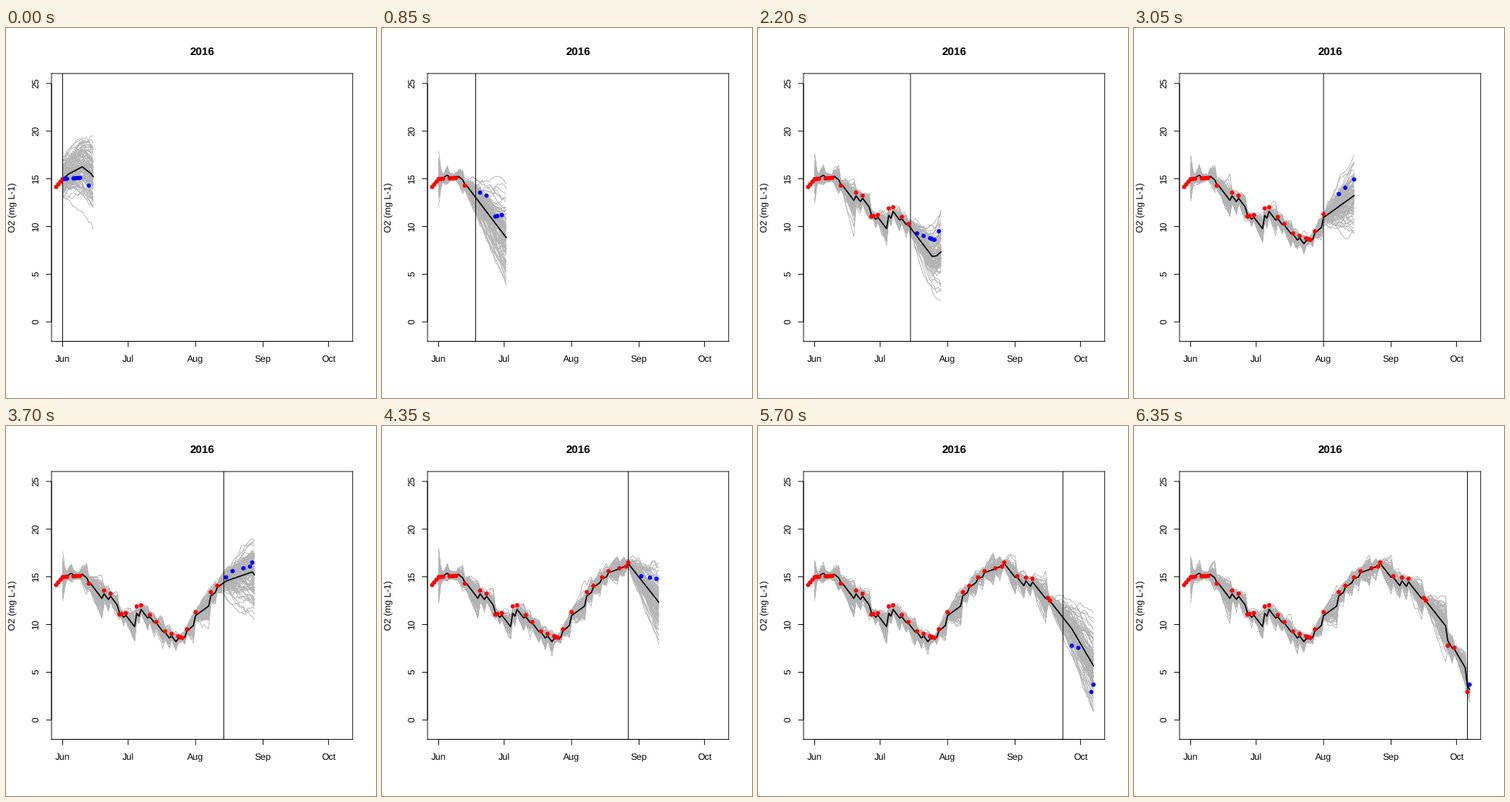
These frames come from a looping animation (480 by 480 pixels, 6400 ms). A matplotlib script:

```python
import numpy as np
import matplotlib.pyplot as plt
from matplotlib.animation import FuncAnimation
from matplotlib.collections import LineCollection
from matplotlib.lines import Line2D

SIZE, DPI = 480, 72
FRAMES, STEP = 128, 50
LAST, HORIZON, MEMBERS = 128, 14, 100
GAIN = 0.7
THIN, THICK = 0.9, 1.6

plt.rcParams["font.family"] = "Liberation Sans"
plt.rcParams["text.hinting"] = "no_hinting"

# Days count from 1 June
SAMPLED = np.array([
    -3, -2, -1, 0, 1, 2, 5, 6, 7, 8, 12, 19, 22, 26, 27, 29, 34, 36, 40, 43,
    47, 50, 53, 54, 55, 57, 61, 68, 71, 75, 78, 83, 86, 87, 93, 97, 100,
    107, 108, 118, 121, 127, 128])

# Turning points of the measured oxygen curve
TURNS = [(-3, 14.15), (0, 14.97), (8, 15.1), (12, 14.29), (22, 13.24),
         (26, 11.05), (29, 11.2), (34, 11.9), (36, 12.02), (40, 11.0),
         (47, 9.28), (55, 8.6), (61, 11.3), (68, 13.4), (78, 15.6),
         (86, 16.08), (87, 16.5), (93, 15.07), (100, 14.8), (108, 12.5),
         (118, 7.78), (121, 7.56), (127, 2.93), (128, 3.7)]

# Model change per day, from the given day on
RATES = [(0, 0.18), (3, 0.12), (9, -0.18), (13, -0.3), (54, 0.04), (56, 0.2),
         (61, 0.165), (75, 0.08), (87, -0.29), (118, -0.39)]

measured = np.interp(SAMPLED, *zip(*TURNS))
obs = dict(zip(SAMPLED.tolist(), measured))
days = np.arange(LAST + 1)
starts, rates = map(np.array, zip(*RATES))
rate = rates[np.searchsorted(starts, days, side="right") - 1]


def mean_path(now, end):
    """Model run, pulled towards each measurement up to now."""
    path = np.full(end + 1, 15.0)
    for d in range(1, end + 1):
        path[d] = path[d - 1] + rate[d - 1]
        if d in obs and d <= now:
            path[d] += GAIN * (obs[d] - path[d])
    return path


def ensemble(now, end):
    """Spread around the mean: grows freely, shrinks at each measurement."""
    rng = np.random.default_rng(2016 + now)

    def normal(scale):
        z = np.clip(rng.normal(size=MEMBERS), -2.6, 2.6)
        return scale * (z - z.mean())

    spread = np.empty((MEMBERS, end + 1))
    spread[:, 0] = normal(1.1)
    slope = normal(0.105)
    for d in range(1, end + 1):
        e = spread[:, d - 1] + slope + normal(0.23)
        if d in obs and d <= now:
            e = (1 - GAIN) * e + normal(0.15)
            slope = normal(0.105)
        spread[:, d] = e
    return spread


fig = plt.figure(figsize=(SIZE / DPI, SIZE / DPI), dpi=DPI, facecolor="white")
left, right, top, bottom = 59.04, 449.76, 59.04, 406.56
ax = fig.add_axes([left / SIZE, 1 - bottom / SIZE,
                   (right - left) / SIZE, (bottom - top) / SIZE])
x0, x1 = -0.04 * LAST, 1.04 * LAST
y0, y1 = -2.04, 26.04
ax.set(xlim=(x0, x1), ylim=(y0, y1), xticks=[], yticks=[])
for spine in ax.spines.values():
    spine.set(linewidth=THIN, snap=False)


def px(d):
    return left + (d - x0) / (x1 - x0) * (right - left)


def py(v):
    return bottom - (v - y0) / (y1 - y0) * (bottom - top)


def rule(xs, ys):
    fig.add_artist(Line2D(np.array(xs) / SIZE, 1 - np.array(ys) / SIZE,
                          color="black", lw=THIN, snap=False,
                          solid_capstyle="butt"))


def label(x, y, text, size=12, **kw):
    fig.text(x / SIZE, 1 - y / SIZE, text, fontsize=size, ha="center",
             va="baseline", rotation_mode="anchor", **kw)


months = {"Jun": 0, "Jul": 30, "Aug": 61, "Sep": 92, "Oct": 122}
for name, d in months.items():
    rule([px(d)] * 2, [bottom, bottom + 7.2])
    label(px(d), 433, name)
for v in range(0, 26, 5):
    rule([left - 7.2, left], [py(v)] * 2)
    label(42, py(v) - 0.5, str(v), rotation=90)
rule([px(0), px(122)], [bottom] * 2)
rule([left] * 2, [py(0), py(25)])
label(13, (top + bottom) / 2, "O2 (mg L-1)", rotation=90)
label((left + right) / 2, 35, "2016", 14.4, weight="bold")

members = LineCollection([], colors="#b3b3b3", linewidths=THIN, zorder=2)
ax.add_collection(members, autolim=False)
mean_line, = ax.plot([], [], color="black", lw=THICK, zorder=3)
now_line = ax.axvline(0, color="black", lw=THIN, zorder=4, snap=False)
dots = ax.scatter([], [], s=5.6 ** 2, linewidths=0, zorder=5, snap=False)


def update(now):
    end = min(now + HORIZON, LAST)
    t = days[:end + 1]
    mean = mean_path(now, end)
    members.set_segments([np.column_stack([t, mean + e])
                          for e in ensemble(now, end)])
    mean_line.set_data(t, mean)
    now_line.set_xdata([now, now])
    shown = SAMPLED <= end
    dots.set_offsets(np.column_stack([SAMPLED, measured])[shown])
    dots.set_facecolors(["red" if d <= now else "blue"
                         for d in SAMPLED[shown]])
    return members, mean_line, now_line, dots


anim = FuncAnimation(fig, update, frames=FRAMES, interval=STEP,
                     repeat=True, repeat_delay=0, blit=False)
plt.show()
```
